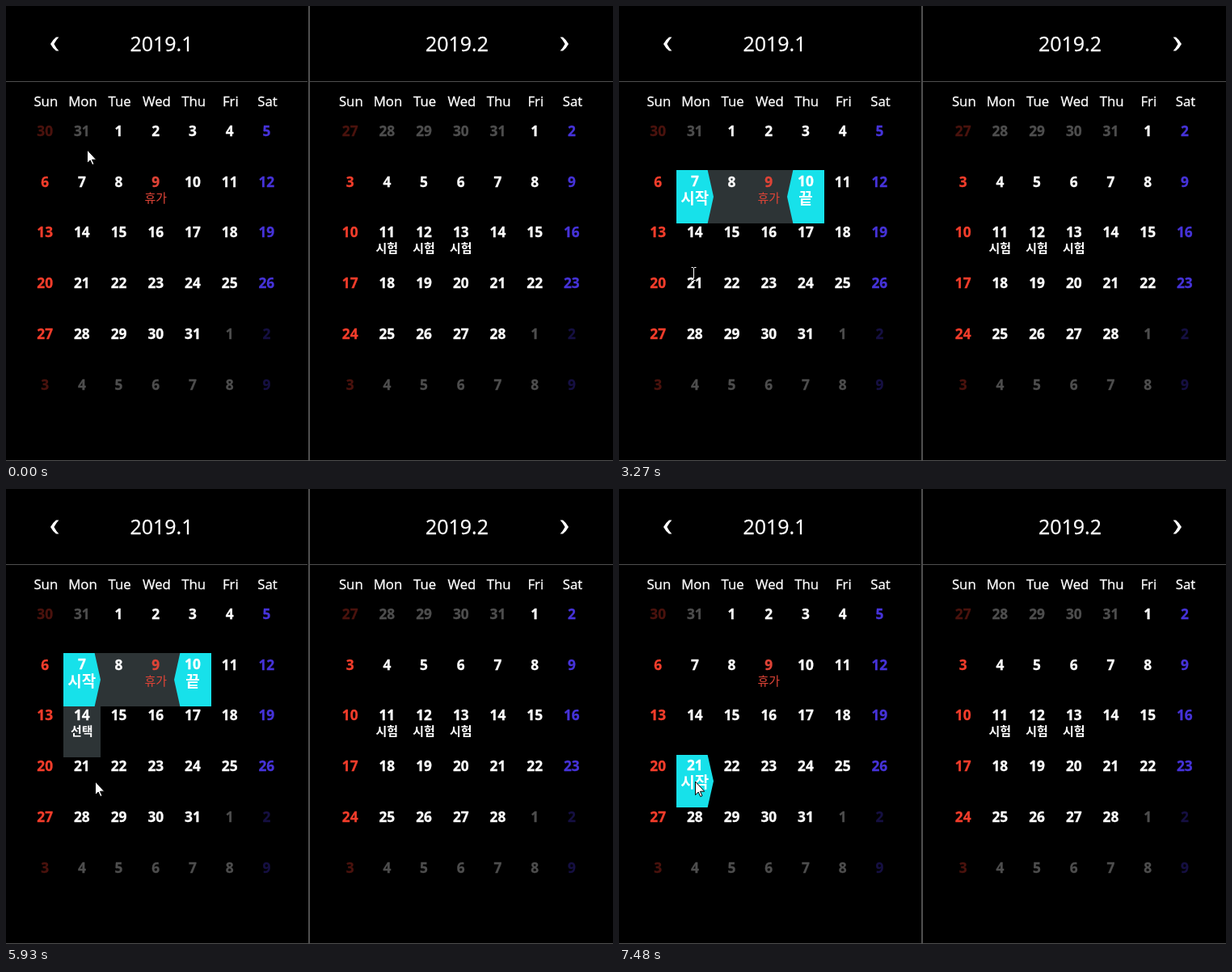
Recreate the animation shown at these times as an HTML page. Size 751 by 563 pixels, loop 8 s.

```html
<!DOCTYPE html>
<html lang="ko">
<head>
<meta charset="utf-8">
<title>Calendar</title>
<style>
  html, body { margin: 0; width: 100%; height: 100%; overflow: hidden; background: #000; }
  svg { display: block; font-family: "Open Sans", "Noto Sans", "Noto Sans CJK KR", "Noto Sans CJK JP", "Noto Sans CJK", sans-serif; }
  text { text-anchor: middle; color: #fff; fill: currentColor; }
  .title, .week, .day { stroke: currentColor; stroke-width: .3; }
  .title { font-size: 25px; }
  .week { font-size: 16.8px; }
  .day { font-size: 17.3px; font-weight: 700; }
  .label { font-size: 15px; font-weight: 700; }
  .big { font-size: 19px; font-weight: 700; }
  .sun text { color: #f43d2b; }
  .sat text { color: #4633d9; }
  .off text { color: #e04437; }
  .off .label { font-weight: 400; }
  .dim { opacity: .3; }
  .back { fill: #2d3436; }
  .cap { fill: #17e1ea; }
  #beam { mix-blend-mode: difference; }
</style>
</head>
<body>
<svg id="stage" width="751" height="563" viewBox="0 0 751 563">
  <g fill="#4f4f4f">
    <rect y="93" width="373" height="1"/>
    <rect x="376" y="93" width="375" height="1"/>
    <rect x="374" width="2" height="562"/>
    <rect y="562" width="751" height="1"/>
  </g>
  <g fill="#fff">
    <path id="prev" d="M62 38.5H65.4Q62 42 59.4 47Q62 52 65.4 55.5H62Q57.6 52 55 47Q57.6 42 62 38.5Z"/>
    <use href="#prev" transform="translate(751 0) scale(-1 1)"/>
  </g>
  <g id="months"></g>
  <g id="pointer">
    <path id="arrow" d="M.5 0V16.6L4.2 13 6.8 18.6 9 17.6 6.5 12.2H11.7Z" fill="#fff" stroke="#000"/>
    <path id="beam" d="M-.5 -5.5H2M3 -5.5H5.5M2.5 -5V10M-.5 10.5H2M3 10.5H5.5" fill="none" stroke="#fff"/>
    <circle id="press" r="12" fill="#fff000" fill-opacity=".5"/>
  </g>
</svg>
<script>
const LOOP = 8000, TICK = 77, COL = 45.7, ROW = 62.8;
const REACT = 120, HOLD = 200; // delays after a press
const $ = id => document.getElementById(id);
const cells = [];

function add(parent, tag, attrs = {}, text = '') {
  const el = document.createElementNS('http://www.w3.org/2000/svg', tag);
  for (const name in attrs) el.setAttribute(name, attrs[name]);
  el.textContent = text;
  return parent.appendChild(el);
}

const write = (parent, cls, x, y, text) => add(parent, 'text', { class: cls, x, y }, text);
const show = (el, on) => { el.style.display = on ? '' : 'none'; };

// Days are numbered from 1 January.
const jan = date => date, feb = date => 31 + date;
const marks = { start: '시작', end: '끝', pick: '선택' };

function eventOn(day) {
  if (day === jan(9)) return '휴가';
  return day >= feb(11) && day <= feb(13) ? '시험' : '';
}

function capPoints(kind, w, h) {
  const flat = kind === 'start' ? 0 : w, tip = w - flat;
  const neck = flat + (tip - flat) * .84;
  return `${flat},0 ${neck},0 ${tip},${h / 2} ${neck},${h} ${flat},${h}`;
}

function buildMonth(month, left, titleX) {
  const root = add($('months'), 'g');
  const backs = add(root, 'g');
  write(root, 'title', titleX, 56, '2019.' + month);
  'Sun Mon Tue Wed Thu Fri Sat'.split(' ').forEach((name, i) =>
    write(root, 'week', left + 24 + i * COL, 124, name));

  const lead = new Date(2019, month - 1, 1).getDay();
  for (let i = 0; i < 42; i++) {
    const date = new Date(2019, month - 1, 1 - lead + i);
    const day = 31 * (month - 1) + 1 - lead + i;
    const inside = date.getMonth() === month - 1;
    const col = i % 7, row = Math.floor(i / 7);
    const tone = day === jan(9) ? 'off' : col === 0 ? 'sun' : col === 6 ? 'sat' : '';
    const g = add(root, 'g', { class: tone + (inside ? '' : ' dim') });

    const x = Math.round(left + col * COL), y = Math.round(140.3 + row * ROW);
    const w = Math.round(left + (col + 1) * COL) - x;
    const h = Math.round(205.9 + row * ROW) - y;
    const mid = left + (col + .5) * COL, base = Math.round(161 + row * 62.7);
    cells.push({
      day, inside, w, h, mid, base,
      back: add(backs, 'rect', { class: 'back', x, y, width: w, height: h }),
      cap: add(g, 'polygon', { class: 'cap', transform: `translate(${x} ${y})` }),
      number: write(g, 'day', mid, base, date.getDate()),
      label: write(g, 'label', mid, base, '')
    });
  }
}

function paint(cell, kind, backed) {
  const capped = kind === 'start' || kind === 'end';
  show(cell.back, backed);
  cell.cap.setAttribute('points', capped ? capPoints(kind, cell.w, cell.h) : '');
  cell.number.setAttribute('y', cell.base - (capped ? 1.5 : 0));
  cell.label.setAttribute('class', capped ? 'big' : 'label');
  cell.label.setAttribute('y', cell.base + (capped ? 20.5 : 18.5));
  cell.label.textContent = marks[kind] || eventOn(cell.day);
}

const week = { from: jan(7), to: jan(10) };
const clicks = [
  { at: 1570, ranges: [{ from: jan(7) }] },
  { at: 2345, ranges: [week] },
  { at: 4530, ranges: [week], pick: jan(14) },
  { at: 6700, ranges: [week, { from: jan(29) }], pick: jan(14) },
  { at: 7230, ranges: [{ from: jan(21) }] }
];

function kindOf(day, { ranges = [], pick }) {
  if (day === pick) return { kind: 'pick', backed: true };
  for (const { from, to = from } of ranges) {
    if (day < from || day > to) continue;
    const kind = day === from ? 'start' : day === to ? 'end' : 'mid';
    return { kind, backed: from < to };
  }
  return { kind: '', backed: false };
}

// Pointer: start point, then moves bent sideways on the way
const home = { x: 100, y: 178 };
const moves = [
  { from: 400, to: 950, x: 91, y: 224, bend: 6 },
  { from: 1880, to: 2267, x: 223, y: 223, bend: 13 },
  { from: 2980, to: 3270, x: 90, y: 329, bend: 0 },
  { from: 3440, to: 3910, x: 93, y: 278, bend: 20 },
  { from: 4060, to: 4370, x: 97, y: 287, bend: 0 },
  { from: 5150, to: 5760, x: 110, y: 362, bend: -75 },
  { from: 5930, to: 6240, x: 200, y: 410, bend: 0 },
  { from: 6240, to: 6623, x: 126, y: 404, bend: 0 },
  { from: 6920, to: 7075, x: 94, y: 362, bend: 0 }
];

function pointerAt(t) {
  const i = moves.findLastIndex(m => m.from <= t);
  if (i < 0) return home;
  const a = moves[i - 1] || home, b = moves[i];
  const steps = Math.round((b.to - b.from) / TICK);
  const f = Math.min(1, Math.floor((t - b.from) / (b.to - b.from) * steps + 1e-6) / steps);
  const u = f * f * (3 - 2 * f);
  const dx = b.x - a.x, dy = b.y - a.y;
  const side = 2 * u * (1 - u) * b.bend / Math.hypot(dx, dy);
  return { x: Math.round(a.x + dx * u - dy * side), y: Math.round(a.y + dy * u + dx * side) };
}

const overNumber = p => cells.some(c =>
  c.inside && Math.abs(p.x - c.mid) < 11 && p.y > c.base - 21 && p.y < c.base + 3);

let shown;
function select(state) {
  if (state === shown) return;
  shown = state;
  for (const cell of cells) {
    const { kind, backed } = kindOf(cell.day, state);
    paint(cell, kind, backed);
  }
}

const empty = {};
function draw() {
  const t = performance.now() % LOOP;
  select(clicks.findLast(c => c.at + REACT <= t) || empty);
  const p = pointerAt(t), beam = overNumber(p);
  $('pointer').setAttribute('transform', `translate(${p.x} ${p.y})`);
  show($('arrow'), !beam);
  show($('beam'), beam);
  show($('press'), clicks.some(c => t >= c.at && t < c.at + HOLD));
  requestAnimationFrame(draw);
}

buildMonth(1, 25.3, 192.5);
buildMonth(2, 402.8, 558);
draw();
</script>
</body>
</html>
```
